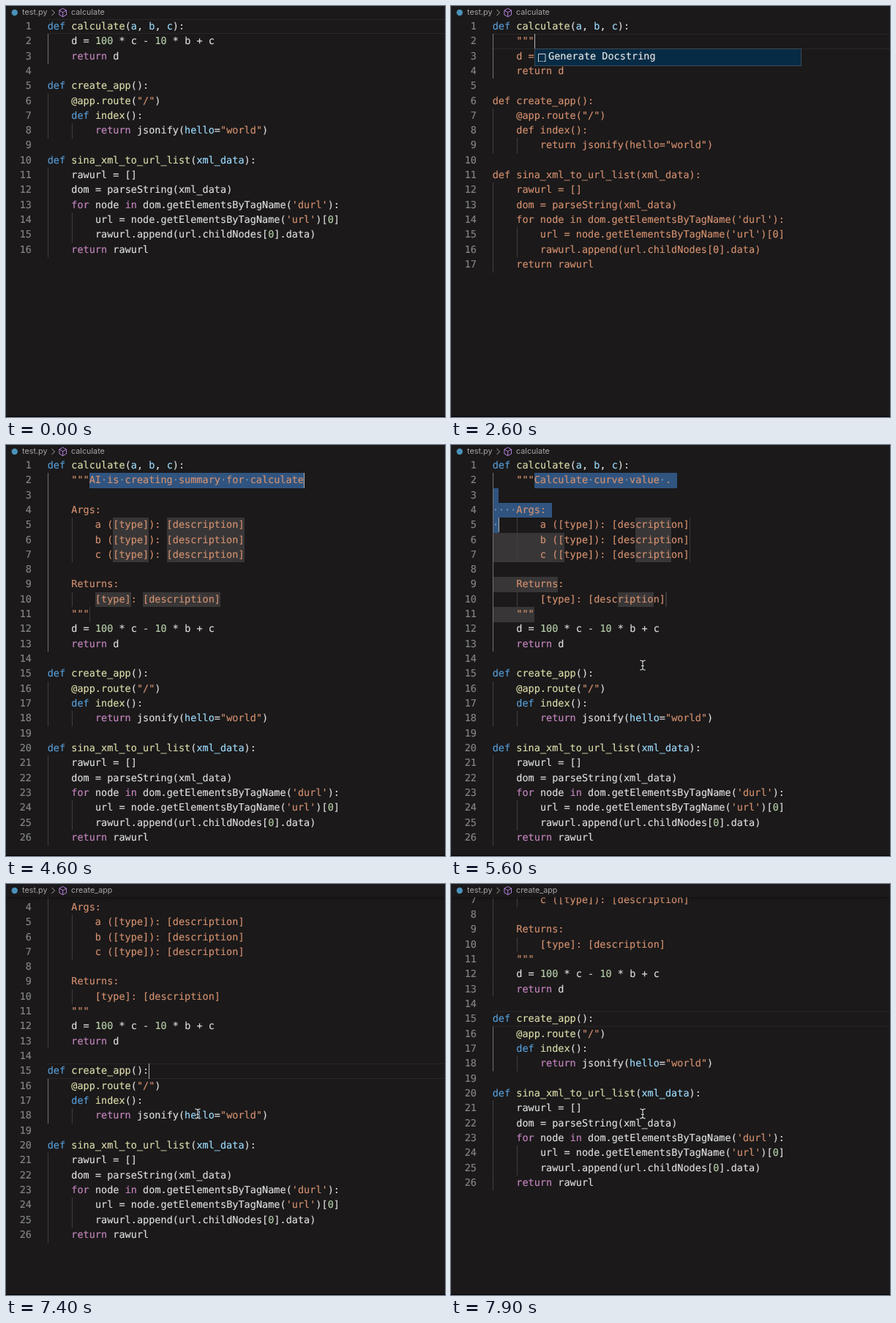
An HTML page for the animation above (8 s loop, 600 by 561 pixels).

```html
<!DOCTYPE html>
<html lang="en">
<head>
<meta charset="utf-8">
<title>Docstring generation</title>
<style>
  html, body { margin: 0; width: 100%; height: 100%; overflow: hidden; background: #1b191a; }
  #stage { position: absolute; left: 0; top: 0; width: 600px; height: 561px; overflow: hidden; background: #1b191a; }
  #stage div, #stage svg { position: absolute; }
  #view { left: 0; top: 18px; width: 600px; height: 542px; overflow: hidden; }
  #doc { left: 0; top: -18px; width: 600px; height: 561px; }
  .row, .num, .dots, #popup {
    font: 13.54px/20.32px "DejaVu Sans Mono", "Liberation Mono", monospace;
    text-rendering: geometricPrecision; white-space: pre; font-variant-ligatures: none;
    -webkit-text-stroke: .15px;
  }
  .row { color: #dedede; }
  .num { left: 0; width: 35px; text-align: right; color: #858585; }
  .dots { color: rgba(227, 228, 226, .4); }
  .current { left: 56px; width: 544px; box-sizing: border-box; border: solid #292728; border-width: 1.5px 0; }
  .guide { width: 1px; background: #403e3f; }
  .guide.on { background: #737172; }
  .sel { background: #30547f; }
  .mark { background: #383637; }
  .kw { color: #569cd6; } .fn { color: #dcdcaa; } .arg { color: #9cdcfe; }
  .num-lit { color: #b5cea8; } .str { color: #d3906f; } .flow { color: #c586c0; }
  #caret { width: 1.3px; background: #b4b4b2; }
  #popup { left: 113.5px; top: 40px; width: 365.5px; height: 24px; box-sizing: border-box; border: 1px solid #3d4a55; background: #062b45; color: #e6e6e6; line-height: 21px; padding-left: 18.5px; }
  #popup svg { left: 3px; top: 5px; }
  #shadow { left: 0; top: 12px; width: 600px; height: 6px; box-shadow: 0 0 4px rgba(0, 0, 0, .6); }
  #head { left: 0; top: 0; width: 600px; height: 18px; background: #1b191a; color: #a6a5a5; font: 10.8px/18px Inter, "Liberation Sans", sans-serif; }
  #head svg { left: 0; top: 0; }
  #base { left: 0; top: 560px; width: 600px; height: 1px; background: #000; }
</style>
</head>
<body>
<div id="stage">
  <div id="view">
    <div id="doc"><div id="lines"></div><div id="caret"></div></div>
    <div id="popup"><svg width="13" height="13" fill="none" stroke="#d0d0d0"><path d="M1.5 11V1.5h9.5V11M1 11.5h2m1 0h1.5m1 0H8m1 0h2.5"/></svg>Generate Docstring</div>
  </div>
  <div id="shadow"></div>
  <div id="head">
    <svg width="90" height="18" fill="none">
      <circle cx="11.8" cy="9" r="4.2" fill="#4a92ba"/>
      <path d="M62.5 5l4 4-4 4" stroke="#a6a5a5"/>
      <path d="M77.7 3.3l4.8 2.7v6l-4.8 2.7-4.8-2.7V6zM72.9 6l4.8 2.7L82.5 6M77.7 8.7v6" stroke="#b180d7" stroke-linejoin="round"/>
    </svg>
    <div style="left:22px">test.py</div>
    <div id="symbol" style="left:89px"></div>
  </div>
  <svg id="mouse" width="11" height="17" fill="none" stroke-linecap="round">
    <path d="M2 2q3 0 3.5 2Q6 2 9 2M5.5 4v9M2 15q3 0 3.5-2Q6 15 9 15M4 9.5h3" stroke="#111" stroke-width="2.6"/>
    <path d="M2 2q3 0 3.5 2Q6 2 9 2M5.5 4v9M2 15q3 0 3.5-2Q6 15 9 15M4 9.5h3" stroke="#ddd" stroke-width="1.1"/>
  </svg>
  <div id="base"></div>
</div>
<script>
const LOOP = 8000, X0 = 56.7, Y0 = 17.9, CW = 8.152, LH = 20.32;
const $ = id => document.getElementById(id);
const colX = c => X0 + c * CW;
const rowY = n => Y0 + (n - 1) * LH;

const first = 'def calculate(a, b, c):';
const rest = `    d = 100 * c - 10 * b + c
    return d

def create_app():
    @app.route("/")
    def index():
        return jsonify(hello="world")

def sina_xml_to_url_list(xml_data):
    rawurl = []
    dom = parseString(xml_data)
    for node in dom.getElementsByTagName('durl'):
        url = node.getElementsByTagName('url')[0]
        rawurl.append(url.childNodes[0].data)
    return rawurl`.split('\n');
const withBody = (...mid) => [first, ...mid, ...rest];
const withDoc = summary => withBody(
  '    """' + summary, '', '    Args:',
  ...['a', 'b', 'c'].map(v => `        ${v} ([type]): [description]`),
  '', '    Returns:', '        [type]: [description]', '    """');

const draft = withDoc('AI is creating summary for calculate');
const final = withDoc('Calculate curve value .');

// Spans are [line, start column, end column]
const fields = [5, 6, 7].flatMap(n => [[n, 11, 17], [n, 20, 33]])
  .concat([[10, 8, 14], [10, 16, 29], [11, 7, 7]]);
const shifted = [5, 6, 7].flatMap(n => [[n, 24, 30], [n, 33, 33]])
  .concat([[6, 0, 12], [7, 0, 12], [9, 0, 11], [10, 21, 27], [10, 29, 29], [11, 0, 7]]);

const steps = [
  { at: -500, code: withBody(), line: 1, col: 23 },
  { at: 1200, code: withBody('    '), line: 2, col: 4 },
  { at: 2000, code: withBody('    ""'), line: 2, col: 5 },
  { at: 2150, code: withBody('    ""'), line: 2, col: 6 },
  { at: 2300, code: withBody('    """'), line: 2, col: 7 },
  { at: 3200, code: draft, line: 2, col: 43, sel: [[2, 7, 43]], marks: fields },
  { at: 5200, code: final, line: 5, col: 1, sel: [[2, 7, 31], [3, 0, 1], [4, 0, 10], [5, 0, 1]], marks: shifted },
  { at: 6200, code: final, line: 15, col: 17 }
];
const scrollKeys = [[7200, 0], [7300, 21], [7400, 56.8], [7500, 84], [7600, 103], [7700, 116], [7800, 124], [7900, 128.4], [8000, 130]];
const mouseKeys = [[5500, 297], [5600, 300.5], [6000, 313.5]];

function lerp(keys, t) {
  if (t <= keys[0][0]) return keys[0][1];
  const i = keys.findIndex(k => k[0] > t);
  if (i < 0) return keys[keys.length - 1][1];
  const [a, va] = keys[i - 1], [b, vb] = keys[i];
  return va + (vb - va) * (t - a) / (b - a);
}

function add(cls, x, y, w, h, text) {
  const el = document.createElement('div');
  el.className = cls;
  Object.assign(el.style, { top: y + 'px', height: h + 'px' });
  if (x !== null) el.style.left = x + 'px';
  if (w !== null) el.style.width = w + 'px';
  if (text) el.textContent = text;
  $('lines').append(el);
  return el;
}

const rules = /("[^"]*"|'[^']*')|(@[\w.]+)|\b(def)\b|\b(return|for|in)\b|\b(\d+)\b|(\w+(?==))|(\w+)|([^\w"'@]+)/g;
const kinds = ['str', 'fn', 'kw', 'flow', 'num-lit', 'arg', '', ''];

function paint(el, text) {
  const isDef = /^\s*def /.test(text);
  let words = 0;
  for (const m of text.matchAll(rules)) {
    const k = m.slice(1).findIndex(g => g !== undefined);
    let cls = kinds[k];
    if (isDef && k === 6) cls = words++ ? 'arg' : 'fn';
    const span = document.createElement('span');
    span.className = cls;
    span.textContent = m[0];
    el.append(span);
  }
}

const indent = s => s.match(/^ */)[0].length;

function depths(code) {
  return code.map((s, i) => {
    if (s.trim()) return indent(s) / 4;
    const near = [code[i - 1], code[i + 1]].map(v => indent(v || ''));
    return Math.max(indent(s), Math.min(...near)) / 4;
  });
}

function build({ code, line, col, sel, marks }) {
  $('lines').textContent = '';
  if (!sel) add('current', null, rowY(line), null, LH);
  for (const [n, a, b] of marks || []) {
    add('mark', colX(a), rowY(n), Math.max((b - a) * CW, 1.6), LH + .2);
  }
  for (const [n, a, b] of sel || []) {
    add('sel', colX(a), rowY(n), (b - a) * CW, LH + .2);
    add('dots', colX(a), rowY(n), null, LH, code[n - 1].slice(a, b).replace(/\S/g, '\u00a0').replace(/ /g, '·'));
  }
  const depth = depths(code);
  // The block around the caret gets the brighter guide
  let from = line, to;
  while (from > 1 && depth[from - 1] > 0) from--;
  for (to = from + 1; depth[to - 1] > 0;) to++;
  let inDoc = false;
  code.forEach((text, i) => {
    const n = i + 1, y = rowY(n);
    for (let d = 0; d < depth[i]; d++) {
      add('guide' + (!d && n > from && n < to ? ' on' : ''), colX(d * 4) + .3, y, null, LH + .3);
    }
    add('num', null, y, null, LH, String(n));
    const row = add('row', X0, y, null, LH);
    const fence = text.includes('"""');
    if (inDoc || fence) {
      row.textContent = text;
      row.className = 'row str';
    } else paint(row, text);
    if (fence) inDoc = !inDoc;
  });
  Object.assign($('caret').style, { left: colX(col) - .2 + 'px', top: rowY(line) + 'px', height: LH + 'px' });
}

const show = (id, on) => { $(id).style.visibility = on ? 'visible' : 'hidden'; };
let shown = null;

function draw(t) {
  const step = steps.filter(s => s.at <= t).pop();
  if (step !== shown) build(shown = step);
  const y = lerp(scrollKeys, t);
  $('doc').style.transform = `translateY(${-y}px)`;
  show('caret', (t - step.at) % 1000 < 500);
  show('popup', t >= 2400 && t < 3200);
  show('shadow', y > 0);
  show('mouse', t >= 5500);
  $('mouse').style.transform = `translate(256.5px, ${lerp(mouseKeys, t) - 8.5}px)`;
  $('symbol').textContent = t < 6400 ? 'calculate' : 'create_app';
}

const start = performance.now();
function tick() {
  draw((performance.now() - start) % LOOP);
  requestAnimationFrame(tick);
}
tick();
</script>
</body>
</html>
```
